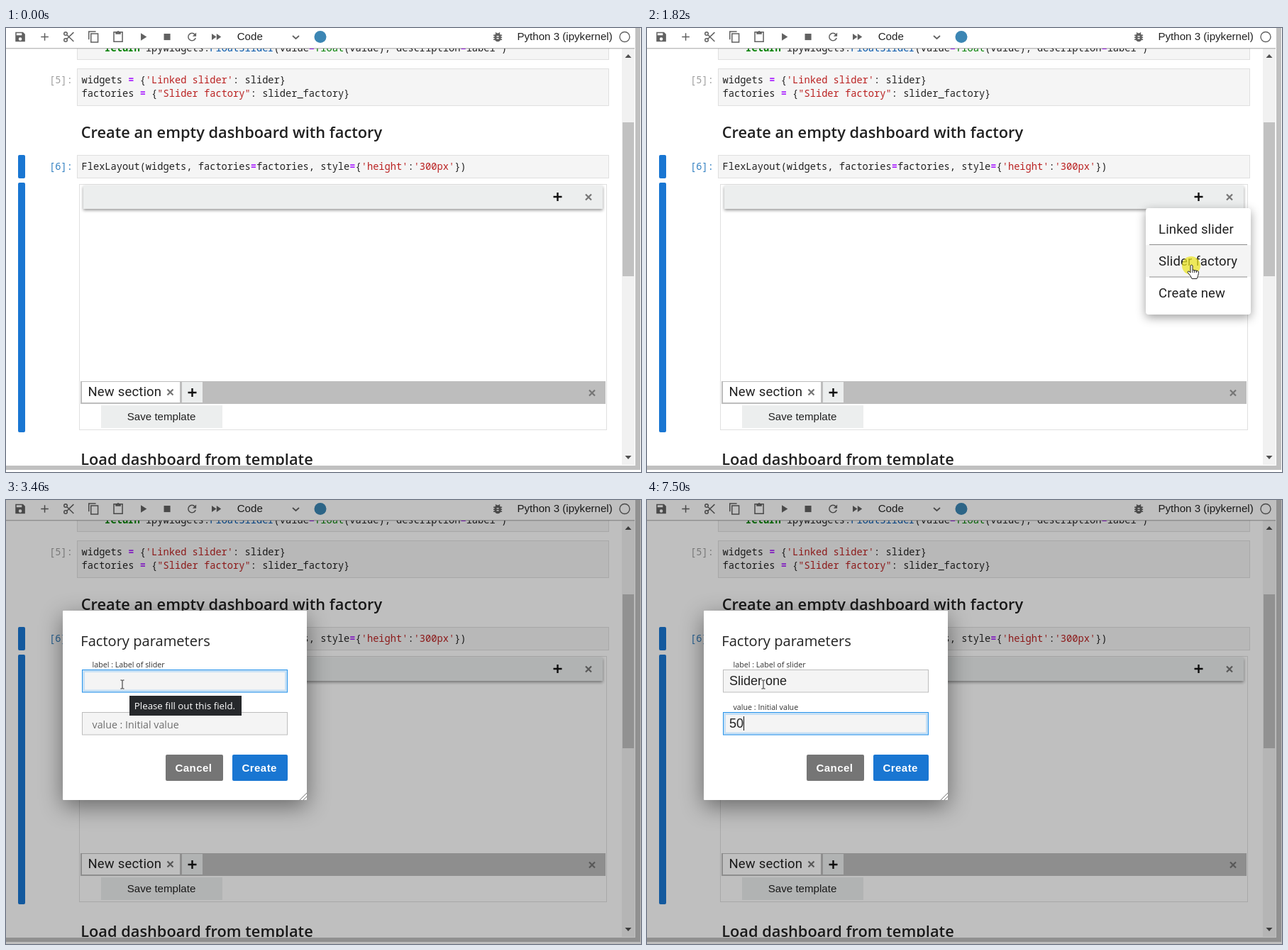
Animation, 895 px wide and 626 px high, one loop 8 s. Source, as an HTML page:

```html
<!DOCTYPE html>
<html lang="en">
<head>
<meta charset="utf-8">
<title>Notebook dashboard</title>
<style>
html, body { margin: 0; width: 100%; height: 100%; overflow: hidden; background: #fff; }
svg { display: block; width: 895px; height: 626px; }
text { fill: #212121; white-space: pre; }
.code { font: 13.7px "Noto Sans Mono", monospace; }
.ui { font: 15.1px "Liberation Sans", Arial, sans-serif; }
.input { font: 18px "Liberation Sans", Arial, sans-serif; }
.button { font: bold 15.1px "Liberation Sans", Arial, sans-serif; letter-spacing: .4px; fill: #fff; }
.tab { font: 18.5px Roboto, sans-serif; letter-spacing: .17px; }
.head { font: 600 21.8px "Open Sans", sans-serif; }
.form { font-family: "Open Sans", sans-serif; }
.op { fill: #a2f; font-weight: bold; }
.str { fill: #ba2121; }
.key { fill: #008000; font-weight: bold; }
.cell { fill: #f5f5f5; stroke: #e0e0e0; }
.field { fill: #f4f4f4; stroke: #bdbdbd; }
.glow { fill: none; stroke: #2196f3; stroke-opacity: .22; stroke-width: 4; }
.line { fill: none; stroke: #616161; stroke-width: 2; }
.x { fill: none; stroke: #757575; stroke-width: 2.2; }
.plus { fill: none; stroke: #111; stroke-width: 2.4; }
#header { filter: drop-shadow(0 2px 2px rgba(0,0,0,.42)); }
#menu { transform-origin: 777px 254px; }
#paper { filter: drop-shadow(0 4px 7px rgba(0,0,0,.38)); }
#panel { filter: drop-shadow(0 9px 16px rgba(0,0,0,.45)); }
.pointer { fill: #fff; stroke: #222; stroke-linejoin: round; }
</style>
</head>
<body>
<svg viewBox="0 0 895 626">
  <defs>
    <path id="cross" class="x" d="M-4-4L4 4M4-4L-4 4"/>
    <path id="add" class="plus" d="M-6 0H6M0-6V6"/>
  </defs>
  <rect width="895" height="626" fill="#fff"/>

  <!-- notebook cells -->
  <rect class="cell" x="100.5" y="10.5" width="749" height="34"/>
  <text class="code" x="139.4" y="33"><tspan class="key">return</tspan> ipywidgets.<tspan fill="#05a">FloatSlider</tspan>(value<tspan class="op">=</tspan><tspan fill="#008000">float</tspan>(value), description<tspan class="op">=</tspan>label )</text>
  <rect class="cell" x="100.5" y="57.5" width="749" height="52"/>
  <text class="code" x="61" y="78" style="fill:#9e9e9e">[5]:</text>
  <text class="code" x="106.5" y="78">widgets <tspan class="op">=</tspan> {<tspan class="str">'Linked slider'</tspan>: slider}</text>
  <text class="code" x="106.5" y="97">factories <tspan class="op">=</tspan> {<tspan class="str">"Slider factory"</tspan>: slider_factory}</text>
  <text class="head" x="105.7" y="155">Create an empty dashboard with factory</text>
  <rect x="17" y="179" width="10" height="33" rx="2" fill="#1976d2"/>
  <rect x="17" y="218" width="10" height="352" rx="2" fill="#1976d2"/>
  <rect class="cell" x="100.5" y="179.5" width="749" height="32"/>
  <text class="code" x="61" y="200" style="fill:#307fc1">[6]:</text>
  <text class="code" x="106.5" y="200">FlexLayout(widgets, factories<tspan class="op">=</tspan>factories, style<tspan class="op">=</tspan>{<tspan class="str">'height'</tspan>:<tspan class="str">'300px'</tspan>})</text>

  <!-- dashboard -->
  <rect x="103.5" y="220.5" width="743" height="346" fill="#fff" stroke="#e0e0e0"/>
  <rect id="header" x="109" y="222" width="732" height="33" fill="#eceeee"/>
  <rect id="hover" x="754" y="222.5" width="47" height="32" fill="#bdbdbd"/>
  <use href="#add" x="777.5" y="238"/>
  <use href="#cross" x="821" y="238.5"/>
  <rect x="105" y="498" width="740" height="32" fill="#bdbdbd"/>
  <rect x="107" y="499" width="138" height="29" fill="#fff"/>
  <text class="tab" x="115.5" y="519">New section</text>
  <use href="#cross" x="231.5" y="513.5"/>
  <rect x="248" y="499" width="29" height="29" fill="#eceeee"/>
  <use href="#add" x="262.5" y="514"/>
  <use href="#cross" x="826" y="514.5"/>
  <rect x="134" y="532" width="171" height="32" fill="#eceeee"/>
  <text class="ui" x="170.8" y="553">Save template</text>
  <text class="head" x="105.2" y="615.5">Load dashboard from template</text>

  <!-- window chrome -->
  <rect y="616" width="895" height="10" fill="#fff"/>
  <rect x="868" y="29" width="18" height="587" fill="#f1f1f1"/>
  <rect x="869" y="133" width="16" height="217" fill="#c1c1c1"/>
  <path d="M872.5 42h9l-4.500-5zM872.500 603h9l-4.500 5z" fill="#505050"/>
  <rect width="886" height="28" fill="#fff"/>
  <rect y="28" width="886" height="1" fill="#bdbdbd"/>
  <rect y="29" width="886" height="1" fill="#000" opacity=".1"/>
  <path d="M887 0h7v623H0v-6h887z" fill="#c0c0c0"/>
  <g id="tools"></g>
  <text class="ui" x="325.7" y="17">Code</text>
  <path class="line" d="M404 11l4.500 4 4.500-4" style="stroke-width:1.700"/>
  <circle cx="443" cy="12.5" r="8.500" fill="#3c86b4"/>
  <text class="ui" x="720.5" y="17">Python 3 (ipykernel)</text>
  <circle class="line" cx="872" cy="12.5" r="7" style="stroke-width:1.400"/>

  <g id="menu">
    <rect id="paper" x="703" y="254" width="148" height="150" rx="4" fill="#fff"/>
    <rect id="item" x="703" width="148" height="45" fill="#f4f4f4"/>
    <path d="M708 305.500H846M708 351H846" stroke="#8c8c8c"/>
    <text class="tab" x="721" y="289.500">Linked slider</text>
    <text class="tab" x="721" y="335">Slider factory</text>
    <text class="tab" x="721" y="380">Create new</text>
    <circle id="ripple" cx="766" cy="335" r="14"/>
  </g>

  <g id="dialog">
    <rect width="895" height="626" opacity=".25"/>
    <rect id="panel" x="80" y="156" width="344" height="267" rx="1" fill="#fff"/>
    <text class="form" x="105.300" y="206" font-size="20.1">Factory parameters</text>
    <g id="fields"></g>
    <rect x="225" y="359" width="81" height="37" rx="2" fill="#757575"/>
    <text class="button" x="238.500" y="382.500">Cancel</text>
    <rect x="319" y="359" width="78" height="37" rx="2" fill="#1976d2"/>
    <text class="button" x="332.500" y="382.500">Create</text>
    <rect id="ring" x="314.500" y="354.500" width="87" height="46" rx="5" fill="none" stroke="#1976d2" stroke-width="1.300"/>
    <path d="M414 423l10-10M419 423l5-5" stroke="#777"/>
    <path id="caret" stroke="#111"/>
    <g id="tip">
      <rect x="174" y="276" width="158" height="28" fill="#26282b"/>
      <text class="form" x="180.800" y="294.500" font-size="13.3" style="fill:#fff">Please fill out this field.</text>
    </g>
  </g>

  <g id="mouse">
    <circle id="click" r="13" fill="#ece420" opacity=".72"/>
    <path id="arrow" class="pointer" d="M1 0v13l3-2.800 2 4.800 2-1-2-4.500h4z"/>
    <g id="hand" class="pointer">
      <path d="M-1 0q1.500-2 3 0v6l7 1.500q2 .5 1.500 3l-1 4-1.500 4H1l-2-4-4-5q0-2 2-1.500l2 2z"/>
      <path d="M2 6v4M4.700 6.500V10M7.400 7V10"/>
    </g>
    <path id="beam" d="M-2.500-6H-.5L0-5.500.5-6H2.500M0-5.500V5.500M-2.500 6H-.5L0 5.500.5 6H2.500" fill="none" stroke="#222"/>
  </g>
</svg>
<script>
const $ = id => document.getElementById(id);
const clamp = v => Math.max(0, Math.min(1, v));
const ramp = (t, a, b) => { const p = clamp((t - a) / (b - a)); return p * p * (3 - 2 * p); };
const within = (t, a, b) => t >= a && t < b;
const show = (id, on) => $(id).style.display = on ? '' : 'none';

// Toolbar icons on a 24-unit grid: centre x, filled path, stroked path
const icons = [
  [20, 'M5 3h12l4 4v14H3V3zM5 5v4h10V5zM12 13a3 3 0 000 6 3 3 0 000-6z', ''],
  [54.5, '', 'M5 12H19M12 5V19'],
  [88.500, '', 'M6 3a3 3 0 000 6 3 3 0 000-6M6 15a3 3 0 000 6 3 3 0 000-6M8 8L21 20.500M8 16L21 3.500'],
  [123.500, '', 'M16 2H3V17M7 6H20V22H7z'],
  [158, 'M7 3h2q3-5 6 0h2v4H7zM12 2a1 1 0 000 2 1 1 0 000-2z', 'M4 3H20V21H4z'],
  [193, 'M8 5v14l11-7z', ''],
  [227, 'M6 6h12v12H6z', ''],
  [262, 'M13 11h7V4z', 'M17.500 7.500A7 7 0 1 0 18.800 14'],
  [296, 'M4 6v12l8.500-6zM13 6v12l8.500-6z', ''],
  [693, 'M6 11a6 6 0 0112 0v4a6 6 0 01-12 0zM10 10v2h4v-2zM10 14v2h4v-2z', 'M4 9H7M17 9H20M4 13H7M17 13H20M4 17H7M17 17H20M8 4L11 7M16 4L13 7']
];
$('tools').innerHTML = icons.map(([x, fill, line]) =>
  `<g transform="translate(${x - 9} 3.500) scale(.755)"><path d="${fill}" fill="#616161" fill-rule="evenodd"/><path class="line" d="${line}"/></g>`).join('');

// Form fields: top edge, hint, focus start and end, hint motion, typed text and key times
const fields = [
  { y: 239, hint: 'label : Label of slider', from: 2860, to: 6620, float: [2860, 3090], text: 'Slider one',
    keys: [3690, 3980, 4200, 4390, 4620, 4770, 4860, 5830, 6070, 6210] },
  { y: 299, hint: 'value : Initial value', from: 6620, to: 8000, float: [6600, 6800], text: '50', keys: [7260, 7500] }
];
$('fields').innerHTML = fields.map(({ y, hint }, i) => `
  <rect id="box${i}" class="field" x="107.500" y="${y + .5}" width="289" height="31.500"/>
  <rect id="glow${i}" class="glow" x="109" y="${y + 2}" width="286" height="28.500"/>
  <text id="hint${i}" class="form" x="121.500">${hint}</text>
  <text id="typed${i}" class="input" x="116" y="${y + 21.500}"></text>`).join('');

const path = [[390, 812, 568], [880, 773, 232], [1240, 773, 232], [1540, 767, 335], [1880, 767, 335],
  [2540, 150, 276], [2670, 163, 266], [2800, 163, 266], [2860, 164, 260]];
function mouseAt(t) {
  const i = path.findIndex(p => p[0] > t);
  if (i < 0) return path[path.length - 1].slice(1);
  if (i === 0) return path[0].slice(1);
  const [a, x, y] = path[i - 1], [b, u, v] = path[i], p = ramp(t, a, b);
  return [x + (u - x) * p, y + (v - y) * p];
}

function drawMouse(t) {
  const [x, y] = mouseAt(t);
  const beam = t >= 2620;
  const hand = !beam && (t < 1000 ? y < 255 : t < 1860 && y > 259);
  $('mouse').setAttribute('transform', `translate(${x} ${y})`);
  show('mouse', t >= 390);
  show('beam', beam);
  show('hand', hand);
  show('arrow', !beam && !hand);
  show('click', within(t, 920, 1040) || within(t, 1770, 1860) || within(t, 2820, 2920));
}

function drawMenu(t) {
  const open = ramp(t, 970, 1160) * (1 - ramp(t, 1890, 2090));
  const y = mouseAt(t)[1];
  show('menu', open > 0);
  $('menu').style.opacity = open;
  $('menu').style.transform = t < 1500 ? `scale(${.75 + .25 * open}, ${.56 + .44 * open})` : '';
  show('item', y > 260 && t < 1860);
  $('item').setAttribute('y', y < 306 ? 260 : 306);
  show('ripple', t >= 1860);
  $('ripple').setAttribute('opacity', .12 * (1 - ramp(t, 1910, 2060)));
}

function drawField(f, i, t) {
  const focus = within(t, f.from, f.to);
  const up = ramp(t, ...f.float);
  const typed = f.text.slice(0, f.keys.filter(k => t >= k).length);
  const grey = Math.round(110 - 60 * up);
  const hint = $('hint' + i), input = $('typed' + i);
  $('box' + i).style.stroke = focus ? '#2a93e8' : '';
  show('glow' + i, focus);
  hint.setAttribute('y', f.y + 23 - 26 * up);
  hint.style.fontSize = 14.25 - 3.55 * up + 'px';
  hint.style.fill = `rgb(${grey},${grey},${grey})`;
  if (input.textContent !== typed) input.textContent = typed;
  if (focus) {
    const x = Math.floor(116 + (typed ? input.getComputedTextLength() : 0)) + .5;
    $('caret').setAttribute('d', `M${x} ${f.y + 6}v20`);
  }
}

function draw(t) {
  const hover = within(t, 840, 1000), pressed = t >= 930;
  show('hover', hover);
  $('hover').setAttribute('stroke', pressed ? '#64a9e6' : 'none');
  show('dialog', t >= 1860);
  show('ring', t < 2860);
  fields.forEach((f, i) => drawField(f, i, t));
  show('caret', t >= 2860 && ![[3460, 3690], [5420, 5830], [7130, 7260]].some(([a, b]) => within(t, a, b)));
  show('tip', within(t, 3460, 3790));
  $('tip').setAttribute('opacity', t < 3690 ? 1 : .5);
  drawMenu(t);
  drawMouse(t);
}

const start = performance.now();
function tick() {
  draw((performance.now() - start) % 8000);
  requestAnimationFrame(tick);
}
tick();
</script>
</body>
</html>
```
